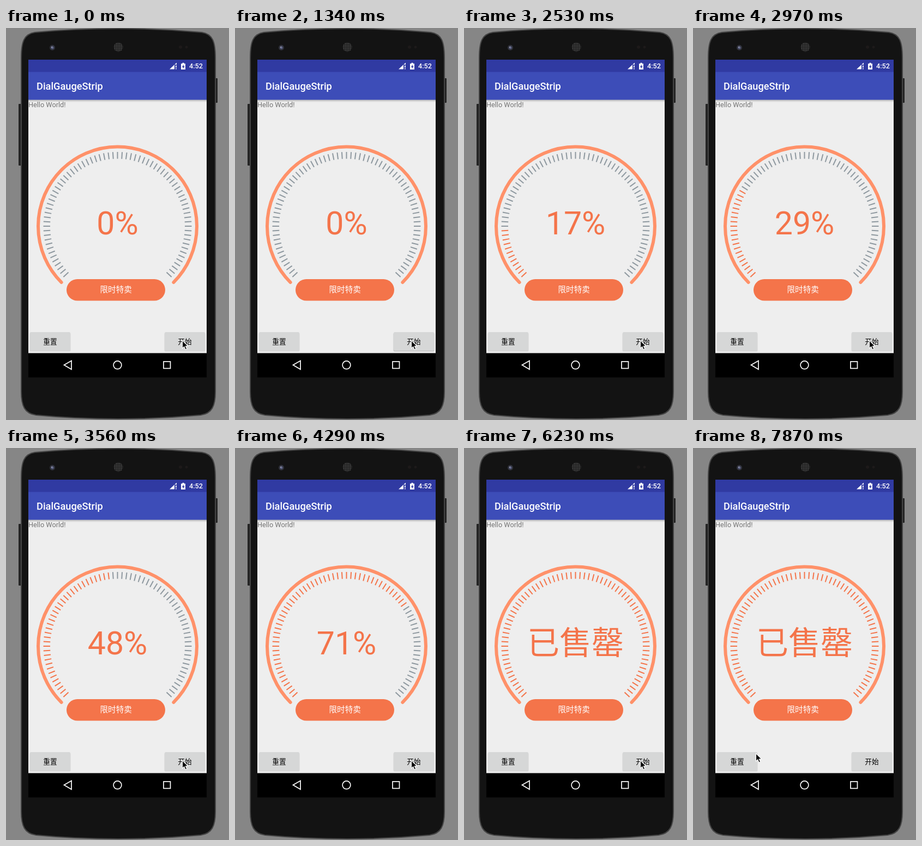
An HTML page that plays this animation: 409 by 718 pixels, repeating every 8000 ms.

```html
<!DOCTYPE html>
<html lang="zh-CN">
<head>
<meta charset="utf-8">
<title>Dial gauge</title>
<style>
html, body { margin: 0; width: 100%; height: 100%; overflow: hidden; background: #868686; }
svg { display: block; width: 100%; height: 100%; }
text { font-family: Roboto, "Noto Sans CJK SC", "Noto Sans CJK", sans-serif; }
.mid { text-anchor: middle; }
.medium { font-weight: 500; }
.outline { fill: none; stroke: #fff; stroke-width: 1.7; }
.button { fill: #d6d7d7; }
.shadow { fill: #000; opacity: .1; }
</style>
</head>
<body>
<svg viewBox="0 0 409 718">
  <defs>
    <linearGradient id="drop" x2="0" y2="1">
      <stop stop-color="#b4b4b4"/><stop offset="1" stop-color="#eee"/>
    </linearGradient>
    <pattern id="mesh" width="3" height="3" patternUnits="userSpaceOnUse">
      <rect width="3" height="3" fill="#191919"/><circle cx="1.5" cy="1.5" r="1" fill="#555"/>
    </pattern>
  </defs>

  <!-- phone -->
  <rect x="23" y="139" width="6" height="113" rx="1" fill="#252525"/>
  <rect x="383" y="92" width="5" height="45" rx="1" fill="#252525"/>
  <path d="M28 55C28 25 33 11 53 8Q205 -6 359 8C379 11 384 25 384 55V666C384 692 378 706 357 709Q205 723 55 709C34 706 28 692 28 666Z"
        fill="#131313" stroke="#444" stroke-width="2"/>
  <circle cx="85" cy="36" r="5" fill="#30323c"/>
  <circle cx="85" cy="36" r="2.5" fill="#5d6386"/>
  <circle cx="84" cy="35" r="1" fill="#aab"/>
  <circle cx="206" cy="35" r="8.5" fill="url(#mesh)"/>
  <circle cx="320" cy="35" r="3" fill="#1d1a1a"/>
  <circle cx="331" cy="35" r="2.5" fill="#1d1a1a"/>

  <!-- screen -->
  <rect x="41" y="58" width="327" height="582"/>
  <rect x="41" y="131" width="327" height="464.5" fill="#eee"/>
  <rect x="41" y="131" width="327" height="5" fill="url(#drop)"/>
  <rect x="41" y="80" width="327" height="51.5" fill="#3d4db8"/>
  <rect x="41" y="58" width="327" height="22.5" fill="#303aa2"/>
  <path d="M300 75.5 313 63.5V67H309V75.5Z" fill="#fff"/>
  <path d="M311 68.5h1.7v4h-1.7zM311 73.8h1.7v1.7h-1.7z" fill="#fff"/>
  <path d="M321 65.2h2.5V63.8h3v1.4H329V76h-8z" fill="#fff"/>
  <path d="M325.8 67 322.7 71.5h1.9V74.7L327.6 70h-1.8z" fill="#303aa2"/>
  <text class="medium" x="336" y="74" font-size="12.7" fill="#fff">4:52</text>
  <text class="medium" x="56" y="113" font-size="18.2" fill="#fff">DialGaugeStrip</text>
  <text x="41" y="145" font-size="12.7" fill="#737373">Hello World!</text>

  <!-- gauge -->
  <path d="M101.6 465.9A145.5 145.5 0 1 1 307.4 465.9" fill="none" stroke="#ff9169" stroke-width="6" stroke-linecap="round"/>
  <g id="ticks" stroke-width="2"></g>
  <text id="label" class="mid" x="204.5" y="377.5" font-size="59" fill="#f4744a"></text>
  <rect x="111" y="460" width="181" height="39.5" rx="19.75" fill="#f4744a"/>
  <text class="mid" x="201.7" y="483.5" font-size="14.6" fill="#fff">限时特卖</text>

  <!-- buttons -->
  <rect class="shadow" x="43.5" y="558" width="75" height="34.5" rx="2.5"/>
  <rect class="button" x="44" y="557" width="74" height="34" rx="2"/>
  <text class="mid medium" x="81" y="578.7" font-size="12.7">重置</text>
  <rect id="startShadow" class="shadow" x="290.5" y="558" width="75" height="34.5" rx="2.5"/>
  <rect class="button" x="291" y="557" width="74" height="34" rx="2"/>
  <text class="mid medium" x="328" y="578.7" font-size="12.7">开始</text>

  <!-- navigation -->
  <path class="outline" d="M106.5 617.3 120 609.5V625.2Z"/>
  <circle class="outline" cx="204.5" cy="617.3" r="7.4"/>
  <rect class="outline" x="289" y="611" width="12.5" height="12.5"/>

  <path id="cursor" d="M0 0V14.2L3.3 11.2 5.6 16.6 8.2 15.5 5.9 10.2H10.2Z" stroke="#fff" stroke-width="1.1"/>
</svg>
<script>
const LOOP = 8000, TICKS = 75, TICK_ANGLE = 3.6;
const STEP = 148, FIRST_STEP = 1034, LAST_STEP = 35;
const RUN_START = 1162, RUN_TIME = 4900;
const byId = id => document.getElementById(id);

const ticks = Array.from({ length: TICKS }, (_, i) => {
  const line = document.createElementNS('http://www.w3.org/2000/svg', 'path');
  line.setAttribute('d', 'M204.5 227V239.5');
  line.setAttribute('transform', `rotate(${(i - (TICKS - 1) / 2) * TICK_ANGLE} 204.5 363)`);
  byId('ticks').append(line);
  return line;
});

function percentAt(step) {
  if (step >= LAST_STEP) return 100;
  const time = 1040 + step * STEP;
  const t = Math.min(1, Math.max(0, (time - RUN_START) / RUN_TIME));
  return Math.min(99, Math.floor(50 * (1 - Math.cos(Math.PI * t))));
}

function cursorAt(time) {
  const move = time < 7580 ? 0 : time < 7725 ? 0.3 : time < 7870 ? 0.75 : 1;
  return [323.5 - 208 * move, 572.5 - 13 * move];
}

function draw(now) {
  const time = now % LOOP;
  const step = Math.floor((time - FIRST_STEP) / STEP);
  const percent = percentAt(step);
  const lit = Math.floor(percent * TICKS / 100);
  ticks.forEach((tick, i) => tick.setAttribute('stroke', i < lit ? '#f4744a' : '#8e989f'));
  byId('label').textContent = percent < 100 ? percent + '%' : '已售罄';
  byId('startShadow').style.opacity = step >= 0 && step < 4 ? 0.18 : 0.1;
  byId('cursor').setAttribute('transform', `translate(${cursorAt(time)})`);
  requestAnimationFrame(draw);
}
draw(performance.now());
</script>
</body>
</html>
```
